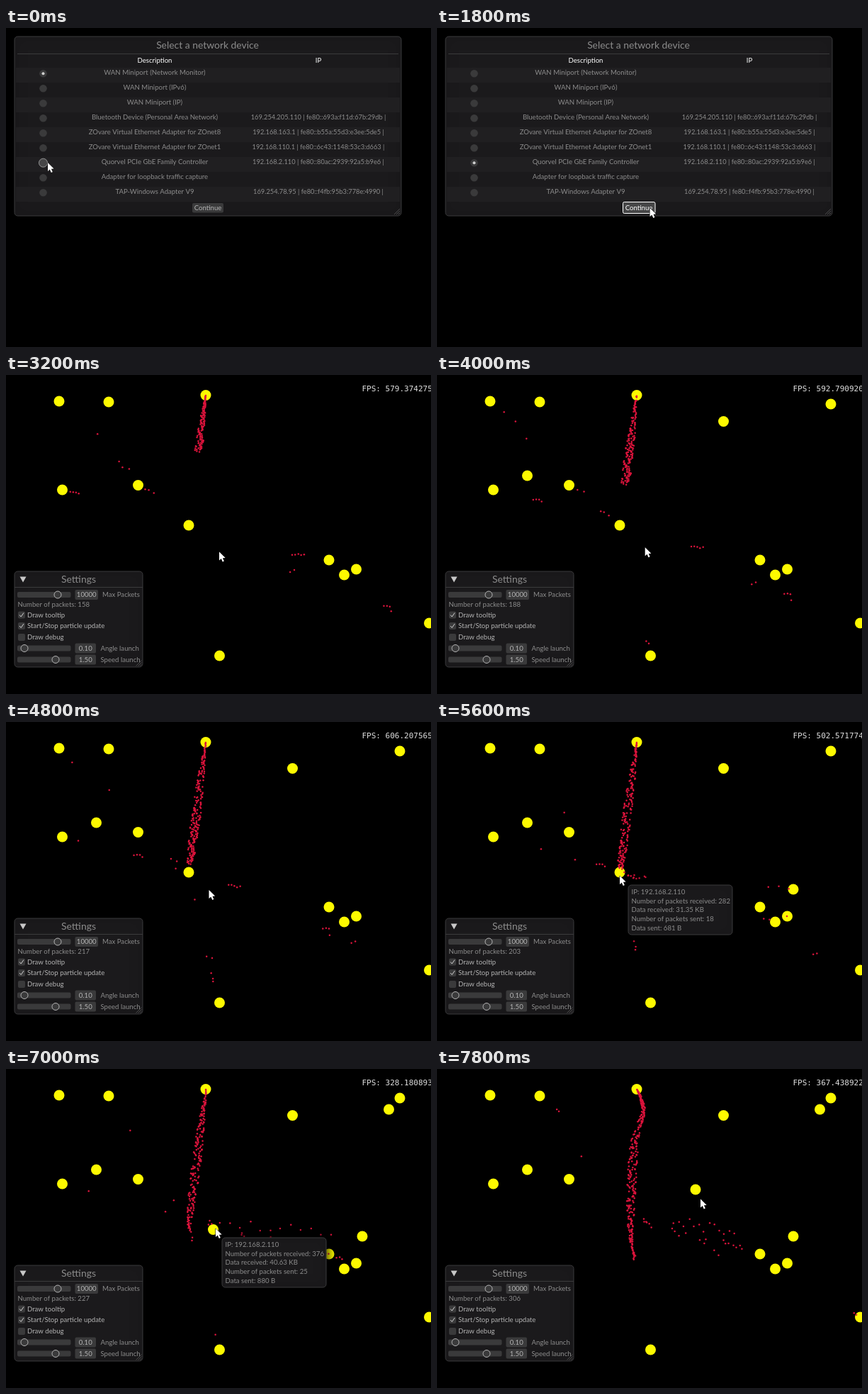
Recreate the animation shown at these times as an HTML page with a canvas. Size 600 px wide and 450 px high, loop 8000 ms.

```html
<!DOCTYPE html>
<html lang="en">
<head>
<meta charset="utf-8">
<title>Packet particles</title>
<style>
html, body { margin: 0; height: 100%; overflow: hidden; background: #000; }
canvas { display: block; }
</style>
</head>
<body>
<canvas id="stage" width="600" height="450"></canvas>
<script>
const ctx = document.getElementById('stage').getContext('2d');
const LOOP = 8000, STEP = 200;
const PANEL = '#1b1a1c', EDGE = '#3b3b3c', WIDGET = '#3a3a3b', DIM = '#8c8c8c', LIGHT = '#b4b4b4';

const mix = (a, b, k) => a + (b - a) * k;

function seededRandom(seed) {
  return () => (seed = (seed * 16807) % 2147483647) / 2147483647;
}

// Linear interpolation through rows of [key, ...values].
function track(rows, key) {
  let i = 0;
  while (i < rows.length - 2 && key > rows[i + 1][0]) i++;
  const a = rows[i], b = rows[i + 1];
  const k = Math.min(1, Math.max(0, (key - a[0]) / (b[0] - a[0])));
  return a.slice(1).map((v, j) => mix(v, b[j + 1], k));
}

function text(str, x, y, color = DIM, { size = 9.6, align = 'left', font = 'Lato, sans-serif' } = {}) {
  ctx.font = `${size}px ${font}`;
  ctx.textAlign = align;
  ctx.fillStyle = color;
  ctx.fillText(str, x, y + size * 0.36);
}

function paint(fill, stroke) {
  ctx.fillStyle = fill;
  ctx.fill();
  if (!stroke) return;
  ctx.strokeStyle = stroke;
  ctx.lineWidth = 1;
  ctx.stroke();
}

function box(x, y, w, h, r, fill, stroke) {
  ctx.beginPath();
  ctx.roundRect(x, y, w, h, r);
  paint(fill, stroke);
}

function disc(x, y, r, fill, stroke) {
  ctx.beginPath();
  ctx.arc(x, y, r, 0, Math.PI * 2);
  paint(fill, stroke);
}

function trace(...points) {
  ctx.beginPath();
  for (let i = 0; i < points.length; i += 2) ctx.lineTo(points[i], points[i + 1]);
}

function line(color, width, ...points) {
  trace(...points);
  ctx.strokeStyle = color;
  ctx.lineWidth = width;
  ctx.stroke();
}

function panel(x, y, w, h) {
  ctx.save();
  ctx.shadowColor = '#000';
  ctx.shadowBlur = 16;
  box(x, y, w, h, 4.5, PANEL, EDGE);
  ctx.restore();
}

function grip(x, y) {
  for (const d of [2, 5, 8]) line('#626262', .7, x - d, y, x, y - d);
}

// ---- Device dialog ----
const devices = [
  ['WAN Miniport (Network Monitor)'],
  ['WAN Miniport (IPv6)'],
  ['WAN Miniport (IP)'],
  ['Bluetooth Device (Personal Area Network)', '169.254.205.110 | fe80::693a:f11d:67b:29db |'],
  ['ZOvare Virtual Ethernet Adapter for ZOnet8', '192.168.163.1 | fe80::b55a:55d3:e3ee:5de5 |'],
  ['ZOvare Virtual Ethernet Adapter for ZOnet1', '192.168.110.1 | fe80::6c43:1148:53c3:d663 |'],
  ['Quorvel PCIe GbE Family Controller', '192.168.2.110 | fe80::80ac:2939:92a5:b9e6 |'],
  ['Adapter for loopback traffic capture'],
  ['TAP-Windows Adapter V9', '169.254.78.95 | fe80::f4fb:95b3:778e:4990 |']
];

function drawDialog(t, [mx, my]) {
  const center = { align: 'center' };
  panel(12, 12, 546, 253);
  text('Select a network device', 284.5, 24, DIM, { size: 13.9, align: 'center' });
  line(EDGE, 1, 16, 36.5, 554, 36.5);
  text('Description', 210, 45.5, '#fff', center);
  text('IP', 441, 45.5, '#fff', center);
  const selected = t < 200 ? 0 : 6;
  devices.forEach(([name, ip], i) => {
    const y = 63 + i * 21;
    if (i % 2 === 0) box(14, y - 7, 542, 21, 0, '#201f21');
    const hover = Math.hypot(mx - 52, my - y - 1) < 9;
    disc(52.5, y + 1.2, hover ? 6 : 5.3, hover ? '#464647' : WIDGET, hover && '#969696');
    if (i === selected) disc(52.5, y + 1.2, 2, '#d0d0d0');
    text(name, 210, y, DIM, center);
    if (ip) text(ip, 441, y, DIM, { size: 9.3, align: 'center' });
  });
  const over = mx > 262 && mx < 308.5 && my > 245 && my < 262;
  if (over) box(262.5, 245.5, 45.5, 16, 2, '#464647', t >= 1800 ? '#fff' : '#969696');
  else box(263, 247, 44, 13.5, 2, WIDGET);
  text('Continue', 285, 253.5, over ? '#fff' : LIGHT, center);
  grip(556, 263);
}

// ---- Packet simulation ----
const host = (x, y, since = 0) => ({ x, y, since });
const server = host(282, 28.5), peer = host(503, 236, 4900);
const others = [
  host(75, 37), host(145, 38), host(79.5, 162), host(186.5, 155.5), host(456, 261), host(477.5, 282),
  host(494.5, 274), host(597.5, 350), host(301.5, 396), host(404.5, 65.5, 3400), host(127.5, 142, 3600),
  host(556, 41, 3800), host(540.5, 57, 6400)
];
const home = host(258, 212);
const homePath = [[6600, 258, 212], [7000, 292.5, 226.5], [7300, 337, 192], [7800, 365, 170]];
const SPEED = 58, TURN = 0.65, LAUNCH_ANGLE = 0.12, TICK = 0.01;

function moveHome(t) {
  [home.x, home.y] = track(homePath, t);
}

// Packets leave at a slightly random angle and steer gently towards their target.
// The result is one list of packet positions for every step of the loop.
function simulate() {
  const random = seededRandom(4242);
  const snapshots = [];
  let packets = [];

  function send(from, to) {
    const angle = Math.atan2(to.y - from.y, to.x - from.x) + (random() * 2 - 1) * LAUNCH_ANGLE;
    packets.push({ x: from.x, y: from.y, vx: SPEED * Math.cos(angle), vy: SPEED * Math.sin(angle), to });
  }

  function steer(p) {
    const dx = p.to.x - p.x, dy = p.to.y - p.y, distance = Math.hypot(dx, dy);
    p.vx += (dx / distance * SPEED - p.vx) * TURN * TICK;
    p.vy += (dy / distance * SPEED - p.vy) * TURN * TICK;
    const scale = SPEED / Math.hypot(p.vx, p.vy) * TICK;
    p.x += p.vx * scale;
    p.y += p.vy * scale;
    return distance > 6;
  }

  let sender = others[0], queued = 0;
  for (let t = 0; t < LOOP; t += TICK * 1000) {
    moveHome(t);
    const load = t < 3200 ? 0.9 : t < 7000 ? 0.6 : 1;
    if (t >= 1820 && random() < load) send(server, home);
    if (t >= peer.since && t < 7000 && t % 250 === 0) {
      send(home, peer);
      if (t < 6400) send(peer, home);
    }
    if (t % 400 === 0) {
      const active = others.filter(h => h.since <= t);
      sender = active[Math.floor(random() * active.length)];
      queued = 1 + Math.floor(random() * 4);
    }
    if (t % 70 === 0 && queued > 0) {
      queued--;
      if (random() < 0.75) send(sender, home);
      else send(home, sender);
    }
    packets = packets.filter(steer);
    if (t % STEP === 0) snapshots.push(packets.map(p => [p.x, p.y]));
  }
  return snapshots;
}
const snapshots = simulate();

// ---- Packet view ----
const mousePath = [
  [200, 59, 190], [1000, 308, 256], [1600, 300.5, 254.5], [3200, 301, 249.5], [4800, 286.5, 237],
  [5600, 258, 217], [6600, 258, 217], [7000, 296, 225], [7300, 342, 196], [7800, 372, 183.5]
];
// [time, live packets, frames per second]
const readouts = [
  [3200, 158, 579.374275], [4800, 217, 606.207565], [6200, 192, 424.844931],
  [7000, 227, 328.180893], [7800, 306, 367.438922]
];

function drawSlider(y, knob, value, valueWidth, label, labelX) {
  box(16, y - 4, 75.5, 8, 2, WIDGET);
  disc(knob, y, 5, WIDGET, LIGHT);
  box(97.5, y - 7, valueWidth, 14, 2, WIDGET);
  text(value, 97.5 + valueWidth / 2, y, LIGHT, { align: 'center' });
  text(label, labelX, y);
}

function drawCheckbox(y, label, checked) {
  box(17, y - 5, 10, 10, 2, WIDGET);
  if (checked) line('#d0d0d0', 1, 19, y, 21.2, y + 2.5, 25, y - 3);
  text(label, 30, y, LIGHT);
}

function drawSettings(count) {
  panel(12, 277, 181, 135);
  trace(19.5, 284.5, 28.5, 284.5, 24, 292.5);
  paint('#c8c8c8');
  text('Settings', 102.5, 288, DIM, { size: 14, align: 'center' });
  line(EDGE, 1, 12, 299.5, 193, 299.5);
  drawSlider(310, 73, '10000', 32.5, 'Max Packets', 136);
  text('Number of packets: ' + Math.round(count), 16.5, 324);
  drawCheckbox(338.5, 'Draw tooltip', true);
  drawCheckbox(354, 'Start/Stop particle update', true);
  drawCheckbox(370, 'Draw debug', false);
  drawSlider(385.5, 26, '0.10', 29.5, 'Angle launch', 133.5);
  drawSlider(401.5, 70, '1.50', 29.5, 'Speed launch', 133.5);
  grip(191.5, 410.5);
}

function drawTooltip(t, mouseY) {
  const k = (t - 6200) / 800;
  const x = Math.round(home.x + 12), y = Math.round(mouseY + 13);
  panel(x, y, 147, 70);
  [
    'IP: 192.168.2.110',
    'Number of packets received: ' + Math.round(mix(322, 376, k)),
    `Data received: ${mix(35.33, 40.63, k).toFixed(2)} KB`,
    'Number of packets sent: ' + Math.round(mix(21, 25, k)),
    `Data sent: ${Math.round(mix(766, 880, k))} B`
  ].forEach((row, i) => text(row, x + 4.5, y + 9.5 + i * 12.75));
}

function drawNetwork(t, [mx, my]) {
  const [count, fps] = track(readouts, t);
  moveHome(t);
  for (const { x, y, since } of [server, home, peer, ...others]) {
    if (t >= since) disc(x, y, 7.5, '#fdf900');
  }
  for (const [x, y] of snapshots[t / STEP]) disc(x, y, 1.25, '#dc143c');
  text('FPS: ' + fps.toFixed(6), 502.5, 19, '#e0e0e0', { size: 11, font: '"DejaVu Sans Mono", monospace' });
  drawSettings(count);
  if (Math.hypot(mx - home.x, my - home.y) < 9) drawTooltip(t, my);
}

function drawCursor([x, y]) {
  ctx.save();
  ctx.translate(x, y);
  trace(0, 0, 0, 12, 2.8, 9.5, 4.8, 14, 6.8, 13, 4.9, 8.8, 8.6, 8.6);
  ctx.closePath();
  paint('#fff', '#000');
  ctx.fill();
  ctx.restore();
}

function frame(now) {
  const t = Math.floor((now % LOOP) / STEP) * STEP;
  const mouse = track(mousePath, t);
  ctx.fillStyle = '#000';
  ctx.fillRect(0, 0, 600, 450);
  if (t < 2200) drawDialog(t, mouse);
  else drawNetwork(t, mouse);
  drawCursor(mouse);
  requestAnimationFrame(frame);
}
requestAnimationFrame(frame);
</script>
</body>
</html>
```
